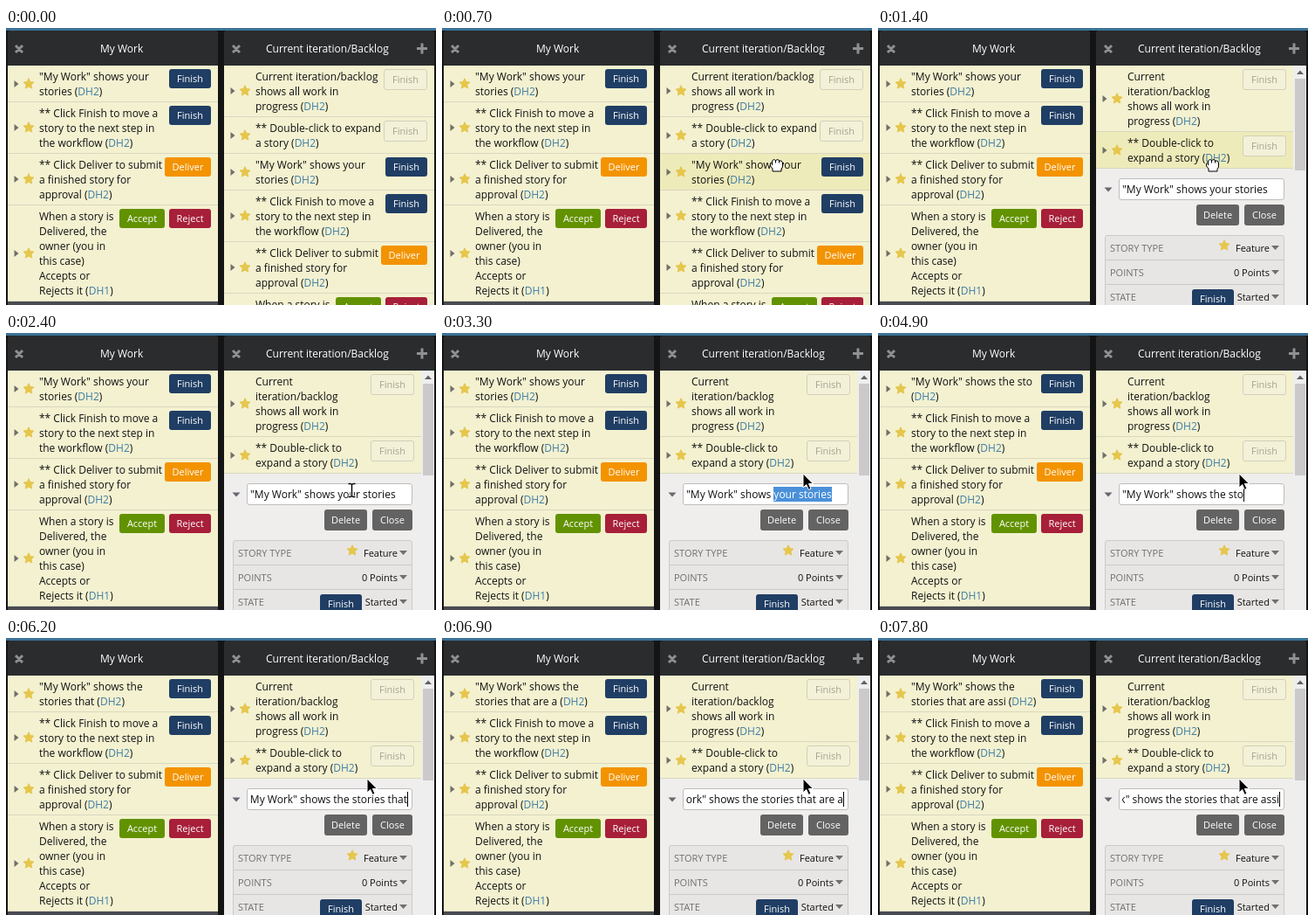
Animation, 493 px wide and 317 px high, one loop 8 s. Source, as an HTML page:

```html
<!DOCTYPE html>
<html lang="en">
<head>
<meta charset="utf-8">
<title>Story editing</title>
<style>
html, body { margin: 0; width: 100%; height: 100%; overflow: hidden; background: #141414; }
body { position: relative; font: 12px/17px "Open Sans", "Noto Sans", sans-serif; color: #111; }
body *, #cursor { box-sizing: border-box; }
.abs, .panel, .head, .head *, .icons, .btns, #edit > * { position: absolute; }
#top { left: 0; top: 0; width: 100%; height: 3px; background: #3b7296; }
.panel { top: 3px; width: 241px; height: 314px; overflow: hidden; background: #484b51; border-radius: 4px 4px 0 0; }
.head { left: 0; top: 0; width: 241px; height: 40px; background: #2b2c2e; color: #fff; }
.head span { top: 12px; white-space: nowrap; }
.rows { margin-top: 40px; }
.row { position: relative; display: flex; align-items: center; min-height: 30px; padding: 4px 0 3px 36px;
  background: #f3f1d0; border-bottom: 1px solid #d9d7bf; white-space: nowrap; }
.row.hover { background: #eeebba; }
.row a { color: #3f7da6; }
#story { width: 145px; white-space: normal; }
.icons { left: 0; top: 50%; margin-top: -9px; }
.btns { right: 8px; top: 4px; display: flex; gap: 5px; }
.btn { height: 22px; border-radius: 3px; color: #fff; font-size: 11px; line-height: 22px; text-align: center; white-space: nowrap; }
.Finish { width: 48px; background: #203e64; }
.Deliver { width: 53px; background: #f39300; }
.Accept { width: 52px; background: #629200; }
.Reject { width: 48px; background: #a71f39; }
.Idle { width: 50px; height: 24px; background: #f3f1d8; border: 1px solid #d2d0b8; color: #a5a390; }
.grey { height: 24px; line-height: 24px; background: #636363; }
#open { position: relative; height: 314px; background: #efeeec; }
#open .row { width: 226px; }
#edit { position: absolute; left: -250px; top: -43px; }
#field { left: 276px; top: 172px; width: 190px; height: 25px; background: #fff; border: 1px solid #bdbdbd; border-radius: 3px; }
#clip { left: 280px; top: 176px; width: 184px; height: 17px; overflow: hidden; }
#text { position: absolute; left: 0; white-space: pre; }
#caret { position: absolute; top: 0; width: 1px; height: 17px; background: #000; }
mark { background: #4a90d9; color: #fff; }
#table { left: 260px; top: 237px; width: 206px; height: 90px; background: #e7e6e4; border: 1px solid #cbcac8; border-radius: 3px; }
.line { left: 260px; width: 206px; height: 1px; background: #cbcac8; }
.small { font-size: 11px; white-space: nowrap; }
.label { left: 266px; color: #707070; }
.value { right: -449px; }
#cursor { left: 0; top: 0; }
</style>
</head>
<body>
<div id="top" class="abs"></div>
<div class="panel" style="left:2px">
  <div class="head"><span style="left:106px">My Work</span></div>
  <div class="rows" id="mine"></div>
</div>
<div class="panel" style="left:250px">
  <div class="head"><span style="left:48px">Current iteration/Backlog</span></div>
  <div class="rows" id="list"></div>
  <div class="rows" id="open"></div>
</div>
<svg id="cursor" class="abs" width="493" height="317">
  <g stroke="#8f9092" stroke-width="3">
    <path d="M11 20l8 8m0-8l-8 8M260 20l8 8m0-8l-8 8M471 23.5h12m-6-6v12"/>
  </g>
  <path id="arrow" d="M0 0V16L3.7 12.6 6.4 18.4 9 17.2 6.4 11.5H11.4Z" fill="#000" stroke="#fff"/>
  <g id="beam" fill="none">
    <path d="M-3.5-7.5H-1L.5-6.5 2-7.5H4.5M.5-6.5V6.5M-3.5 7.5H-1L.5 6.5 2 7.5H4.5" stroke="#fff" stroke-width="3"/>
    <path d="M-3.5-7.5H-1L.5-6.5 2-7.5H4.5M.5-6.5V6.5M-3.5 7.5H-1L.5 6.5 2 7.5H4.5" stroke="#000" stroke-width="1.4"/>
  </g>
  <g id="hand" fill="#fff" stroke="#000" stroke-linejoin="round">
    <path d="M-4 7V4L-6.5 1V-2L-4.500-3V-5L-2.500-6.500-.5-5.500 2-6.500 4-5 6-5 7.500-3V2L6 4.500V7Z"/>
    <path d="M-4.500-3V0M-.5-5.500V-2.500M3.500-5V-2.500" fill="none"/>
  </g>
</svg>
<script>
const $ = id => document.getElementById(id);
const btn = kind => `<div class="btn ${kind}">${kind === "Idle" ? "Finish" : kind}</div>`;

const starPoints = (x, y) => Array.from({length: 10}, (_, i) => {
  const r = i % 2 ? 3 : 6.3, a = i * Math.PI / 5;
  return [x + r * Math.sin(a), y - r * Math.cos(a)].map(v => v.toFixed(1));
}).join(" ");
const star = (x, y) =>
  `<polygon points="${starPoints(x, y)}" fill="#e6c64c" stroke="#e6c64c" stroke-linejoin="round"/>`;

const link = s => s.replace(/DH\d/, "<a>$&</a>");
const row = (text, kinds, id = "") => `<div class="row">
  <svg class="icons" width="36" height="18"><path d="M7.500 5l5 4-5 4z" fill="#707068"/>${star(24, 9)}</svg>
  <div id="${id}">${link(text).replaceAll("|", "<br>")}</div>
  <div class="btns">${kinds.split(" ").map(btn).join("")}</div></div>`;

const first = '"My Work" shows your|stories (DH2)';
const rest =
  row("** Click Finish to move a|story to the next step in|the workflow (DH2)", "Finish") +
  row("** Click Deliver to submit|a finished story for|approval (DH2)", "Deliver") +
  row("When a story is|Delivered, the|owner (you in|this case)|Accepts or|Rejects it (DH1)", "Accept Reject");

$("mine").innerHTML = row(first, "Finish", "story") + rest;
$("list").innerHTML =
  row("Current iteration/backlog|shows all work in|progress (DH2)", "Idle") +
  row("** Double-click to expand|a story (DH2)", "Idle") +
  row(first, "Finish") + rest;

const greyBtn = (name, x, w) => `<div class="btn grey" style="left:${x}px;top:202px;width:${w}px">${name}</div>`;
const property = (name, value, y) =>
  `<div class="small label" style="top:${y - 8}px">${name}</div>
   <div class="small value" style="top:${y - 8}px">${value}</div>`;
$("open").innerHTML =
  row("Current|iteration/backlog|shows all work in|progress (DH2)", "Idle") +
  row("** Double-click to|expand a story (DH2)", "Idle") +
  `<div id="edit">
    <div id="field"></div>
    <div id="clip"><span id="text"></span><div id="caret"></div></div>
    ${greyBtn("Delete", 365, 49)}${greyBtn("Close", 420, 46)}
    <div id="table"></div>
    <div class="line" style="top:265px"></div><div class="line" style="top:293px"></div>
    ${property("STORY TYPE", "Feature", 251)}
    ${property("POINTS", "0 Points", 279)}
    ${property("STATE", "Started", 307)}
    <div class="btn Finish" style="left:360px;top:299px">Finish</div>
    <svg width="493" height="317" style="left:0;top:0">
      <path d="M259.500 182.500h9l-4.500 5z" fill="#686870"/>
      <path d="M451 249h9l-4.500 5zm0 28h9l-4.500 5zm0 28h9l-4.500 5z" fill="#707070"/>
      ${star(397, 249)}
      <rect x="476" y="43" width="15" height="274" fill="#efeeee"/>
      <rect x="478" y="58" width="12" height="105" fill="#cbc9c9"/>
      <path d="M480 53l4-4.500 4 4.500z" fill="#606060"/>
    </svg>
  </div>`;

// Pointer path: time, shape, x, y, index of the hovered row
const moves = [
  [0, ""],
  [300, "arrow", 452, 17], [400, "hand", 425, 70, 0], [500, "hand", 402, 115, 1],
  [600, "hand", 388, 147, 2], [700, "hand", 383, 157, 2], [1400, "hand", 383, 157, 1],
  [1900, "arrow", 387, 163], [2000, "beam", 393, 175], [2100, "beam", 396, 180],
  [2700, "beam", 403, 181], [2800, "beam", 412, 182], [2900, "beam", 418, 182],
  [3300, "arrow", 414, 161]
];

const start = '"My Work" shows ', typed = "the stories that are assi";
const run = (from, n) => Array.from({length: n}, (_, i) => from + i * 100);
const keys = [3900, ...run(4100, 3), 4500, 4600, 4900, ...run(5300, 6), ...run(6000, 8), 6900, 7100, 7200, 7800];

function movePointer(t) {
  const [, shape, x, y, hover] = moves.findLast(m => m[0] <= t);
  for (const id of ["arrow", "beam", "hand"]) {
    $(id).style.display = id === shape ? "" : "none";
    $(id).setAttribute("transform", `translate(${x || 0} ${y || 0})`);
  }
  for (const id of ["list", "open"])
    $(id).querySelectorAll(".row").forEach((r, i) => r.classList.toggle("hover", i === hover));
}

function fillField(t) {
  const count = keys.filter(k => k <= t).length;
  const value = start + (count ? typed.slice(0, count) : "your stories");
  $("story").innerHTML = link(value + " (DH2)");
  const picked = count || t < 2600 ? "" : t < 2800 ? "your" : "your stories";
  $("text").innerHTML = picked ? value.replace(picked, "<mark>$&</mark>") : value;
  const width = $("text").getBoundingClientRect().width, shift = Math.min(0, 180 - width);
  $("text").style.left = shift + "px";
  $("caret").style.left = (count ? Math.round(width + shift) : 114) + "px";
  $("caret").style.display = count || (t >= 2100 && t < 2400) ? "" : "none";
}

let last = -1;
function draw() {
  const t = Math.floor(performance.now() % 8000 / 100) * 100;
  if (t !== last) {
    last = t;
    $("list").style.display = t < 1400 ? "" : "none";
    $("open").style.display = t < 1400 ? "none" : "";
    movePointer(t);
    fillField(t);
  }
  requestAnimationFrame(draw);
}
draw();
</script>
</body>
</html>
```
